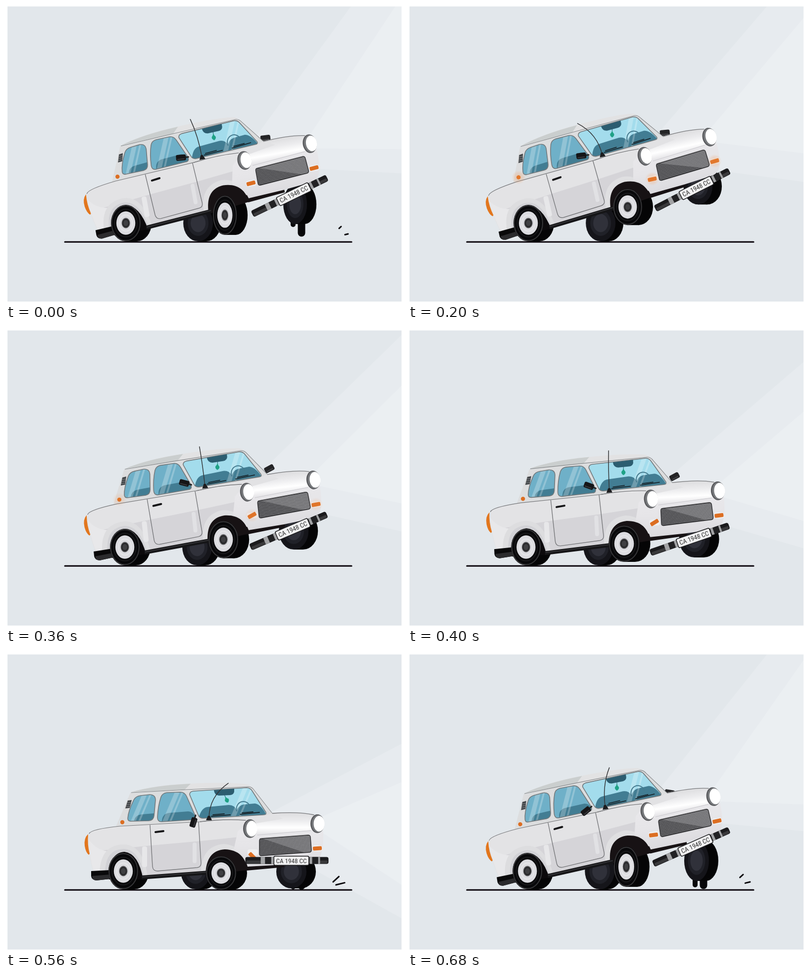
Animation, 800 px wide and 600 px high, one loop 720 ms. Source, as an HTML page with a canvas:

```html
<!DOCTYPE html>
<html lang="en">
<head>
<meta charset="utf-8">
<title>Bouncing car</title>
<style>
  html, body { margin: 0; width: 100%; height: 100%; overflow: hidden; background: #fff; }
  canvas { display: block; }
</style>
</head>
<body>
<canvas id="stage" width="800" height="600"></canvas>
<script>
const ctx = document.getElementById('stage').getContext('2d');
const LOOP = 720, STEP = 40, RAD = Math.PI / 180;

// Key poses; every channel has one value per key time.
const TIMES = [0, 120, 280, 400, 480, 560, 680];
const CHANNELS = {
  tilt:      [-10.2, -12.4, -10.9, -2.8, 7.7, 0, -8.6],
  wheelY:    [424, 408, 412, 433, 452, 444, 431],
  wheelRx:   [24, 29, 29, 31, 35, 30.5, 25],
  wheelRy:   [40, 37, 37, 37, 27, 34, 41],
  farY:      [-22, -42, -35, -9, -2, -3, -12],
  bumperY:   [385, 371, 382, 424, 469, 418.5, 391],
  bumperA:   [-26, -26, -27, -19, 0.5, 0, -24],
  beamL:     [-25.5, -20.5, -21, -12.2, -2.4, 0.7, -23],
  beamR:     [-28, -19.6, -23, -12, -2.3, 5, -26.5],
  antenna:   [-17, -45, -23.4, -1, 5, 28.5, 5.6],
  mirror:    [5, 5, 8, 23, -7, -73, -30],
  farMirror: [0, 12, -8, -28, 0, 0, 15],
  farDrop:   [0, 0, -2, -6, 0, 16, 6],
  blinker:   [0, 4, 0, -25, -5, 50, 5],
  charm:     [-8, 0, 0, 0, -28, -25, 0],
  glow:      [0, 0, 1, 0, 0, 0, 0],
  dripA:     [460, 390, 390, 390, 390, 470, 469],
  dripB:     [443, 390, 390, 390, 390, 472, 468]
};

// Periodic cubic through the key values
function sample(values, t) {
  const n = TIMES.length;
  const time = j => TIMES[(j + n) % n] + LOOP * Math.floor(j / n);
  const value = j => values[(j + n) % n];
  const slope = j => (value(j + 1) - value(j - 1)) / (time(j + 1) - time(j - 1));
  let i = n - 1;
  while (TIMES[i] > t) i--;
  const d = time(i + 1) - time(i), u = (t - time(i)) / d, v = 1 - u;
  return v * v * (1 + 2 * u) * value(i) + u * u * (3 - 2 * u) * value(i + 1)
    + u * v * d * (v * slope(i) - u * slope(i + 1));
}

function fill(d, color) {
  ctx.fillStyle = color;
  ctx.fill(new Path2D(d));
}
function line(d, color, width = 1) {
  ctx.strokeStyle = color;
  ctx.lineWidth = width;
  ctx.stroke(new Path2D(d));
}
function oval(x, y, rx, ry, color, stroke) {
  ctx.beginPath();
  ctx.ellipse(x, y, rx, ry, 0, 0, 7);
  if (stroke) {
    ctx.strokeStyle = color;
    ctx.lineWidth = stroke;
    ctx.stroke();
  } else {
    ctx.fillStyle = color;
    ctx.fill();
  }
}
function box(x, y, w, h, r, color) {
  ctx.beginPath();
  ctx.roundRect(x, y, w, h, r);
  ctx.fillStyle = color;
  ctx.fill();
}
function placed(x, y, angle, draw) {
  ctx.save();
  ctx.translate(x, y);
  ctx.rotate(angle * RAD);
  draw();
  ctx.restore();
}
function inBody(tilt, draw) {
  placed(258, 398, tilt, () => {
    ctx.translate(-258, -398);
    draw();
  });
}
function gradient(y0, y1, ...colors) {
  const g = ctx.createLinearGradient(0, y0, 0, y1);
  colors.forEach((c, i) => g.addColorStop(i / (colors.length - 1), c));
  return g;
}

function beam(x, y, angle) {
  placed(x, y, angle, () => fill('M-20 0L780-434V434Z', 'rgba(255,255,255,.17)'));
}

function tread(x, y, rx, ry, depth) {
  oval(x + depth, y, rx, ry, '#050506');
  ctx.fillRect(x, y - ry, depth, ry * 2);
}

function rim(x, y, rx, ry, far) {
  const ring = (k, color, width) => oval(x, y, rx * k, ry * k, color, width);
  ring(1, far ? '#15151a' : '#08080a');
  if (far) {
    ring(.7, '#202128');
    ring(.5, '#30313a');
    return;
  }
  ring(.96, '#363638', 2);
  ring(.76, '#19191b', 2);
  ring(.64, '#dcdce0');
  ring(.44, '#e9e9eb', 1.5);
  ring(.29, '#767679');
  ring(.25, '#29292b');
  ring(.16, '#3f3f42');
}

function glass(shape, color, seats, stripes) {
  ctx.save();
  fill(shape, color);
  ctx.clip(new Path2D(shape));
  fill(seats, '#427d93');
  for (const [x, w] of stripes) {
    fill(`M${x} 268h${w}l-32 76h${-w}Z`, 'rgba(255,255,255,.24)');
  }
  ctx.restore();
  line(shape, '#73797c', 1.6);
}

function windows(p) {
  glass('M246 333Q247 318 258 296Q262 288 272 287L290 285Q302 285 302 296L299 328Q298 337 289 338L252 339Q246 339 246 333Z',
    '#6fb0c8', 'M258 345Q258 326 275 325L310 322V345Z', [[282, 10], [297, 4]]);
  glass('M306 331Q307 308 313 290Q316 282 325 281L352 280Q361 280 365 289L382 327Q384 336 376 336L314 340Q306 340 306 331Z',
    '#6fb0c8', 'M315 345Q313 324 330 322L368 319Q382 319 388 345Z', [[346, 10], [360, 4]]);
  glass('M371 285Q371 279 378 278L486 271Q493 271 497 277L525 321Q527 326 520 326L398 333Q392 333 389 328Z',
    '#a3dcec', 'M388 338Q393 311 408 310L450 306Q462 306 466 317Q470 307 480 305L503 303Q516 305 528 330Z',
    [[480, 10], [496, 4]]);
  line('M466 318A14 15 0 0 1 493 310', '#447a8e', 2);
  fill('M420 276L461 273V279Q460 285 453 286L430 287Q421 286 420 276Z', '#2c5d70');
  placed(441, 285, p.charm - p.tilt, () => {
    line('M0 0V7', '#2c5d70');
    fill('M0 4Q1 8 4 11Q5 15 0 18Q-5 15-4 11Q-1 8 0 4Z', '#1fa286');
  });
  line('M415 329L453 326M418 326L441 324M473 325L512 321M477 322L499 320', '#17242a', 1.8);
}

function shell() {
  fill('M222 350L251 282L372 275L494 269Q499 270 502 276L538 323L520 340L392 344Z', '#dcddde');
  fill('M253 280Q300 266 365 263Q440 259 480 263Q492 264 496 270L372 277Z', '#e2e2e3');
  fill('M253 280Q300 266 373 263L361 275Z', '#cacece');
  line('M253 281L365 275L490 269Q497 269 502 277L538 323', '#85888a', 1.1);
  fill('M168 364Q170 359 182 356Q205 351 230 349L392 340Q440 334 484 337L490 430L405 445L275 455L208 457L178 447Q166 410 166 372Z', '#e3e3e5');
  fill('M196 398L293 388L394 379L470 371L488 430L405 445L275 455L200 452Z', '#d5d4d8');
  fill('M167 375Q168 408 178 445L208 455L205 400Q180 396 167 375Z', '#e8e8ea');
  fill('M189 450Q188 387 238 386Q277 387 286 450Z', '#dddddf');
  fill('M200 450Q198 396 238 395Q270 396 279 452Z', '#d2d2d6');
  fill('M208 457Q207 403 239 401Q268 404 277 457Z', '#0c0a0c');
  box(275, 390, 10, 42, 4, '#e7e7e9');
  box(377, 382, 8, 42, 4, '#e1e1e4');
  fill('M394 447Q393 389 440 385Q478 387 494 436Z', '#dfdfe1');
  fill('M403 448Q404 398 442 396C470 397 484 412 488 438Z', '#171214');
  fill('M274 449L410 439V447L274 457Z', '#151517');
  line('M276 452L408 442', '#333336', 2);
  line('M291 347L296 431Q297 440 306 440L386 433Q394 432 394 424L389 341', '#77787b', 1.4);
  line('M168 364Q172 355 230 349L392 340Q440 334 484 337', '#77787b', 1.2);
  line('M302 361L318 359', '#151517', 4);
  fill('M246 297L254 296L250 312L241 313Z', '#434649');
  line('M245 301H252M244 305H251M243 309H250', '#83878a');
  oval(235, 341, 4.2, 4.2, '#dc6e22');
  fill('M166 365Q157 373 159 389Q161 402 167 407L169 405Q164 386 166 365Z', '#e2761d');
  fill('M172 440L210 438V456L182 459Q173 458 172 450Z', '#09090a');
  fill('M174 450L210 447V456L182 459Q174 458 174 450Z', '#2b2b2d');
}

function grille() {
  const shape = 'M516 374L610 367Q615 367 615 372L617 397Q617 402 612 402L516 409Q512 409 512 405V379Q512 374 516 374Z';
  ctx.save();
  fill(shape, '#3b3b3e');
  ctx.clip(new Path2D(shape));
  fill('M512 372L620 364V408Z', '#636366');
  ctx.setLineDash([1.4, 1.5]);
  for (let y = 369; y < 418; y += 2.9) line(`M511 ${y}L620 ${y - 8}`, 'rgba(225,225,228,.5)', 1.3);
  ctx.restore();
  line(shape, '#3a3a3c', 1.6);
}

function headlight(x, y) {
  oval(x, y, 14, 19, '#57585b');
  oval(x + 1, y, 12.5, 17.5, '#77797c');
  oval(x + 3.5, y, 11, 16, '#fff');
}

function front(p) {
  fill('M482 424L562 423V432L486 439Z', '#171214');
  fill('M484 345L640 350Q643 385 637 404Q635 415 622 421L560 427L488 431C483 410 472 400 460 397L468 360Z', gradient(345, 430, '#e9e8eb', '#e6e5e8', '#dcdbdf'));
  fill('M395 339L526 327L538 322Q590 319 628 328L620 357L506 366L480 338Z', gradient(324, 366, '#dfdfe1', '#ececee', '#fff', '#e5e4e7'));
  fill('M395 339L526 327L538 322L560 334L500 344L482 337Q440 334 395 339Z', '#e2e2e4');
  line('M538 323Q590 319 622 326M392 340Q440 334 484 337', '#77787b', 1.3);
  line('M508 367L616 358', '#d2d1d5', 1.5);
  grille();
  headlight(493, 354);
  headlight(629, 344);
  box(488, 396, 21, 12, 4, '#efeff0');
  box(619, 388, 20, 12, 4, '#efeff0');
  placed(498, 402 + Math.max(0, p.blinker) * .16, p.blinker - 4, () => box(-9, -4, 18, 8, 2, '#dc6e22'));
  placed(629, 394, -4, () => box(-9, -4, 18, 8, 2, '#dc6e22'));
  ctx.globalAlpha = Math.min(1, Math.max(0, p.glow));
  for (const [x, y] of [[235, 341], [498, 402], [629, 394]]) {
    const g = ctx.createRadialGradient(x, y, 2, x, y, 14);
    g.addColorStop(0, 'rgba(240,140,65,.55)');
    g.addColorStop(.65, 'rgba(245,165,110,.33)');
    g.addColorStop(1, 'rgba(245,175,125,0)');
    oval(x, y, 14, 14, g);
  }
  ctx.globalAlpha = 1;
}

function accessories(p) {
  placed(410, 334, 0, () => {
    const a = (p.antenna - p.tilt) * RAD;
    line(`M0 0Q0-45 ${82 * Math.sin(a)} ${-82 * Math.cos(a)}`, '#333436', 1.5);
    fill('M-6 3L-2-6H2L6 3Z', '#1c1c1e');
  });
  placed(383, 327, p.mirror, () => {
    line('M-6 0H0', '#222', 3);
    box(-25, -6, 20, 12, 3, '#151517');
    line('M-22 3H-9', '#38383b', 2);
  });
}

function plate() {
  const label = 'CA 1948 CC';
  const setFont = size => ctx.font = `condensed ${size}px "Roboto Condensed", Roboto, "Open Sans", sans-serif`;
  box(-27, -9.5, 72, 20, 3, '#1c1c1e');
  box(-25.5, -8, 69, 17, 2, '#f1f1f2');
  ctx.fillStyle = '#333';
  ctx.textAlign = 'center';
  ctx.textBaseline = 'middle';
  setFont(16);
  setFont(Math.min(16, 16 * 62 / ctx.measureText(label).width));
  ctx.fillText(label, 9, 1.2);
}

function bumper(p) {
  placed(567.5 - .55 * p.tilt, p.bumperY, p.bumperA, () => {
    box(-84, -7, 168, 14, 4, '#1b1b1d');
    box(-82, 0, 164, 6, 2, '#39393b');
    for (const [x, w] of [[-53, 9], [-32, 6], [46, 6], [63, 4]]) box(x, -7, w, 14, 1, '#a2a3a5');
    box(-44, -7, 12, 14, 1, '#222224');
    box(51, -7, 12, 14, 1, '#222224');
    plate();
  });
}

function sparks(t) {
  const age = (t - 460 + LOOP) % LOOP;
  if (age >= 400) return;
  const start = 1 - (1 - age / 400) ** 1.8, end = Math.min(1, age / 120);
  for (const [dx, dy] of [[27, -25], [41, -10]]) {
    line(`M${650 + dx * start} ${472 + dy * start}L${650 + dx * end} ${472 + dy * end}`, '#0b080c', 3);
  }
}

function draw(t) {
  const p = {};
  for (const name in CHANNELS) p[name] = sample(CHANNELS[name], t);
  const farY = p.wheelY + p.farY;
  const rear = [237 - .5 * p.tilt, 440, 30, 37];
  const farRear = [rear[0] + 146, 440, 30, 37];
  const near = [434.5 - .75 * p.tilt, p.wheelY, p.wheelRx, p.wheelRy];
  const far = [near[0] + 142, farY, p.wheelRx, p.wheelRy];

  ctx.lineCap = 'round';
  ctx.lineJoin = 'round';
  ctx.fillStyle = '#e2e7eb';
  ctx.fillRect(0, 0, 800, 600);
  inBody(p.tilt, () => {
    beam(493, 354, p.beamL - p.tilt);
    beam(629, 344, p.beamR - p.tilt);
  });
  line('M119 478.3H698', '#0e090f', 3);
  sparks(t);

  tread(...farRear, 16);
  rim(...farRear, true);
  line(`M597 ${farY}V${Math.max(farY, p.dripA)}`, '#08080a', 15);
  line(`M580 ${farY}V${Math.max(farY, p.dripB)}`, '#08080a', 10);
  tread(...far, 19);
  rim(...far, true);
  tread(...rear, 22);
  tread(...near, 22);

  inBody(p.tilt, () => {
    placed(543, 317 + p.farDrop, p.farMirror + 3, () => {
      box(-10, -6, 20, 12, 3, '#242426');
      line('M-6 3H6', '#454548', 2);
    });
    shell();
    windows(p);
  });
  rim(...rear);
  rim(...near);
  inBody(p.tilt, () => {
    front(p);
    accessories(p);
  });
  bumper(p);

  ctx.fillStyle = '#fff';
  ctx.fillRect(0, 0, 3, 600);
  ctx.fillRect(0, 0, 800, 1);
  ctx.fillRect(799, 0, 1, 600);
  ctx.fillRect(0, 599, 800, 1);
}

const begin = performance.now();
function tick() {
  const t = (performance.now() - begin) % LOOP;
  draw(Math.floor(t / STEP) * STEP);
  requestAnimationFrame(tick);
}
tick();
</script>
</body>
</html>
```
